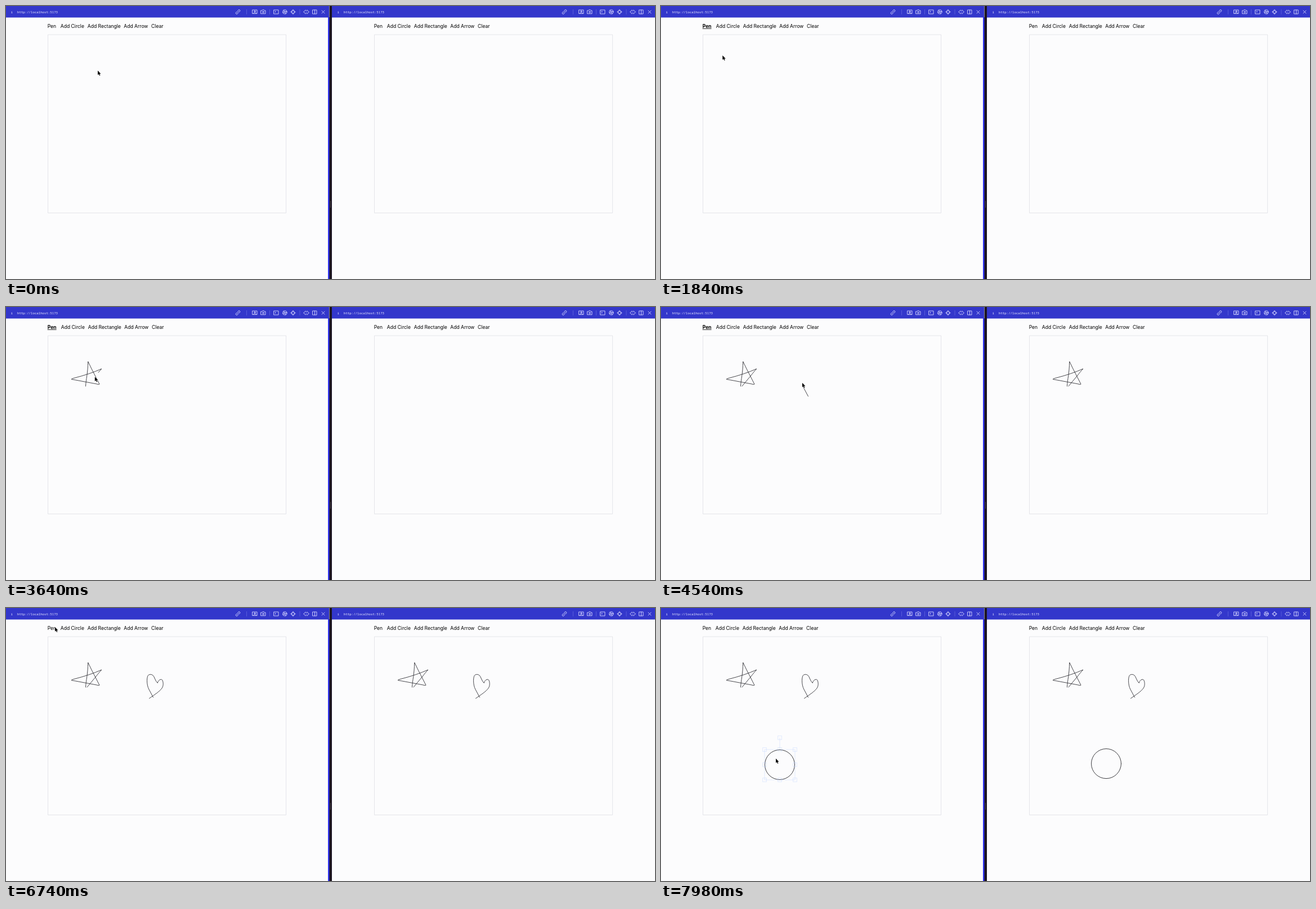
Recreate the animation shown at these times as an HTML page. Size 1153x486 px, loop 8000 ms.

```html
<!DOCTYPE html>
<html lang="en">
<head>
<meta charset="utf-8">
<title>Shared whiteboard</title>
<style>
  html, body { margin: 0; width: 100%; height: 100%; overflow: hidden; background: #fcfcfd; }
  svg { display: block; width: 1153px; height: 486px; }
  .url { font: 500 5.72px "Noto Sans Mono", "DejaVu Sans Mono", monospace; fill: #f0f0ff; }
  .tool { font: 8.55px Inter, "Liberation Sans", sans-serif; fill: #000; }
  .on { font-weight: 700; text-decoration: underline; }
  .icons { fill: none; stroke: #d8d9ff; stroke-width: .9; stroke-linecap: round; stroke-linejoin: round; }
  .ink { fill: none; stroke: #333338; stroke-width: .9; stroke-linecap: round; stroke-linejoin: round; }
  .handles { fill: none; stroke: #b2ccff; stroke-width: .7; }
</style>
</head>
<body>
<svg viewBox="0 0 1153 486">
  <defs>
    <g id="window">
      <path fill="#3337cb" d="M-1 0H574V20.5H-1z"/>
      <text class="url" x="8.4" y="12.8" font-weight="700">i</text>
      <text class="url" x="20" y="12.8">http://localhost:5173</text>
      <path stroke="#6366dc" stroke-width=".8" d="M427.5 6v9M468.5 6v9M522 6v9"/>
      <g class="icons">
        <g transform="translate(412 10.5) rotate(-45)">
          <path d="M-1-1.7H-3a1.7 1.7 0 0 0 0 3.4h2M1-1.7H3a1.7 1.7 0 0 1 0 3.4H1M-1.8 0H1.8"/>
        </g>
        <path d="M438 7h8v6.5h-8zM440 13c0-2.5 4-2.5 4 0"/><circle cx="442" cy="9.6" r="1.2"/>
        <path d="M453 8h2l1-1.3h2L459 8h2v5.7h-8z"/><circle cx="457" cy="10.7" r="1.4"/>
        <path d="M476 7h8v7h-8zM478 9l1.3 1.1L478 11.2"/>
        <circle cx="495.3" cy="10.4" r="3.7"/><circle cx="495.3" cy="10.4" r="1.3"/>
        <path d="M494.5 9.4L493.4 7.2M496.5 10L498.8 9.4M495.8 11.6L497 13.8M494 10.8L491.8 11.4"/>
        <circle cx="510" cy="10.5" r="3"/><path d="M510 6.3v2.4M510 12.3v2.4M505.8 10.5h2.4M511.8 10.5h2.4"/>
        <path d="M532 7.5l-3.5 3 3.5 3M535 7.5l3.5 3-3.5 3M532 7.5l1.5 1.4L535 7.5M532 13.5l1.5-1.4 1.5 1.4"/>
        <path d="M545 7h7v7h-7zM548.5 7v7"/>
        <path d="M561 8l5 5M566 8l-5 5"/>
      </g>
      <path fill="none" stroke="#dedfe5" stroke-width=".8" d="M74.5 51H497.6V368.4H74.5z"/>
    </g>
    <g id="tools" class="tool">
      <text x="96.8" y="38.8">Add Circle</text>
      <text x="144.8" y="38.8">Add Rectangle</text>
      <text x="209.3" y="38.8">Add Arrow</text>
      <text x="258.1" y="38.8">Clear</text>
    </g>
    <path id="star" class="ink" pathLength="1"
      d="M141.5 141C142 129 145.5 118 145.7 97L152 110L166 137.3Q165 138.6 161 137L116 128.6Q116 128 121 126.5Q150 119 169.8 110Q166 114 159 123L144 141"/>
    <path id="heart" class="ink" pathLength="1"
      d="M261.5 159L254 145C249.5 137 249.5 121 253.5 119C258 117 262 119 264 125Q267 132 269.3 133.5C270 129 275 125.5 277.5 128C279.5 131 280 138 277.5 142C273 149 264 154 254.5 161"/>
    <circle id="ring" r="26.5" class="ink" style="stroke:#26262b"/>
  </defs>

  <path fill="#fcfcfd" d="M0 0H1153V486H0z"/>
  <use href="#window"/>
  <use href="#window" x="580"/>
  <path fill="#3033ee" d="M572 20H575V486H572z"/>
  <path fill="#1b1422" d="M574.5 0H579V486H574.5z"/>
  <path stroke="#55505c" stroke-width=".8" d="M576.5 347v12"/>

  <text id="pen" class="tool" x="73.7" y="38.8">Pen</text>
  <use id="leftTools" href="#tools"/>
  <text class="tool" x="653.7" y="38.8">Pen</text>
  <use href="#tools" x="580"/>

  <use id="starL" href="#star"/>
  <use id="starR" href="#star" x="580"/>
  <use id="heartL" href="#heart"/>
  <use id="heartR" href="#heart" x="580"/>
  <g id="ringL">
    <use href="#ring"/>
    <g id="handles" class="handles"></g>
  </g>
  <use id="ringR" href="#ring"/>
  <path id="cursor" fill="#000" stroke="#fff" stroke-width=".7" paint-order="stroke"
    d="M0 0V7.8L1.8 6.2L3.1 9.1L4.4 8.5L3.1 5.7H5.5z"/>
</svg>
<script>
const LOOP = 8000, LEAD = 50, GRAB = 7450, SPAWN = 7060;
const $ = id => document.getElementById(id);
const clamp = v => Math.min(1, Math.max(0, v));

const strokes = [
  { id: 'star', start: 2600, end: 3800 },
  { id: 'heart', start: 4440, end: 5150 },
];
for (const s of strokes) {
  s.path = $(s.id);
  s.length = s.path.getTotalLength();
}

// Cursor stops between the strokes: time, x, y
const stops = [
  [60, 163, 115], [800, 78, 38], [1400, 79, 38], [2300, 141.5, 141],
  [2550, 141.5, 141], [3750, 144, 141], [4390, 261.5, 159], [5100, 254.5, 161],
  [5640, 205, 75], [6200, 83, 35], [6680, 85, 34], [6740, 87, 34],
  [7020, 117, 37], [7120, 117, 37], [GRAB, 147, 120], [7930, 204, 266], [7980, 204, 268],
];

function cursorAt(t) {
  for (const s of strokes) {
    const k = (t + LEAD - s.start) / (s.end - s.start);
    if (k >= 0 && k <= 1) {
      const p = s.path.getPointAtLength(k * s.length);
      return [p.x, p.y];
    }
  }
  const i = stops.findIndex(s => s[0] > t);
  if (i === 0) return stops[0].slice(1);
  if (i < 0) return stops.at(-1).slice(1);
  const [t0, x0, y0] = stops[i - 1], [t1, x1, y1] = stops[i];
  const k = (t - t0) / (t1 - t0), e = k * k * (3 - 2 * k);
  return [x0 + (x1 - x0) * e, y0 + (y1 - y0) * e];
}

function ringAt(t) {
  const [x, y] = cursorAt(Math.max(t, GRAB));
  return [x + 7, y + 11];
}

const show = (id, on) => $(id).setAttribute('visibility', on ? 'visible' : 'hidden');
const move = (id, [x, y], dx = 0) => $(id).setAttribute('transform', `translate(${x + dx} ${y})`);

// Selection box with eight grips and a rotation grip
const R = 27;
let box = `M${-R} ${-R}H${R}V${R}H${-R}zM0 ${-R}V-48`;
const grip = (x, y) => box += `M${x - 3.4} ${y - 3.4}h6.8v6.8h-6.8z`;
for (const x of [-R, 0, R]) for (const y of [-R, 0, R]) if (x || y) grip(x, y);
grip(0, -48);
$('handles').innerHTML = `<path d="${box}"/>`;

function draw(t) {
  const penOn = t >= 1300 && t < 6450;
  $('pen').classList.toggle('on', penOn);
  $('leftTools').setAttribute('x', penOn ? 1 : 0);

  for (const s of strokes) {
    const k = clamp((t - s.start) / (s.end - s.start));
    show(s.id + 'L', k > 0);
    show(s.id + 'R', t >= s.end + 60);
    $(s.id + 'L').style.strokeDasharray = k < 1 ? `${k} 2` : 'none';
    s.path.style.strokeDasharray = 'inherit';
  }

  show('ringL', t >= SPAWN);
  show('ringR', t >= SPAWN + 60);
  move('ringL', ringAt(t));
  move('ringR', ringAt(t - 45), 580);
  show('handles', t >= GRAB);
  $('handles').setAttribute('opacity', t > GRAB + 40 ? .5 : 1);
  move('cursor', cursorAt(t));
}

const begin = performance.now();
function frame() {
  draw((performance.now() - begin) % LOOP);
  requestAnimationFrame(frame);
}
draw(0);
frame();
</script>
</body>
</html>
```
